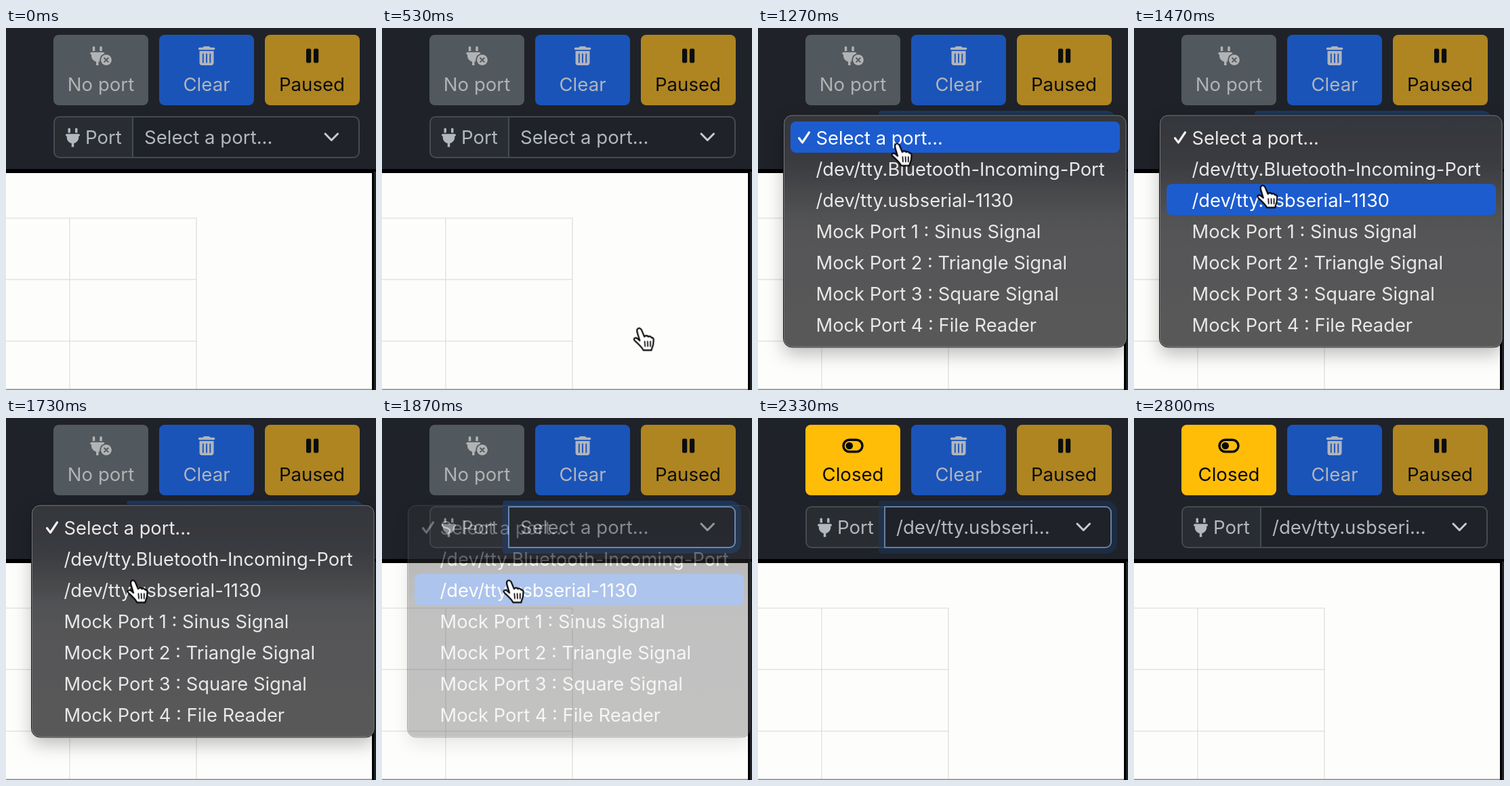
An HTML page for the animation above (2870 ms loop, 546 by 534 pixels).

```html
<!DOCTYPE html>
<html lang="en">
<head>
<meta charset="utf-8">
<title>Port selection</title>
<style>
  html, body { margin: 0; width: 100%; height: 100%; overflow: hidden; background: #1f2228; }
  svg { display: block; width: 100vw; height: 100vh; }
  text {
    font: 27.6px Inter, "Liberation Sans", sans-serif;
    font-optical-sizing: none;
    white-space: pre;
  }
  .mid { text-anchor: middle; }
  .menu text { font-size: 27.3px; fill: #e8e8e8; }

  .step { animation: 2870ms step-end infinite; }
  .before { animation-name: before; }
  .after { animation-name: after; }
  .button { animation-name: button; }
  .ink { animation-name: ink; }
  .focus { animation-name: focus; }
  .menu { animation-name: menu; }
  .bar { animation-name: bar; }
  .row0 { animation-name: row0; }
  .row1 { animation-name: row1; }
  .row2 { animation-name: row2; }
  .ring { animation-name: ring; }
  .cursor { animation: move 2870ms linear infinite; }

  @keyframes before { 0% { opacity: 1 } 71.95%, 100% { opacity: 0 } }
  @keyframes after { 0% { opacity: 0 } 71.95%, 100% { opacity: 1 } }
  @keyframes button {
    0% { fill: #51595e }
    71.95% { fill: #7b7a6c }
    74.04% { fill: #c0983a }
    76.5% { fill: #f3b412 }
    78.9%, 100% { fill: #ffbd08 }
  }
  @keyframes ink {
    0% { color: #dcdcd2 }
    74.04% { color: #696660 }
    76.5%, 100% { color: #080808 }
  }
  @keyframes focus {
    0% { opacity: 0 }
    34.5% { opacity: 1 }
    81% { opacity: .5 }
    83.5%, 100% { opacity: 0 }
  }
  @keyframes menu {
    0% { opacity: 0 }
    34.5% { opacity: 1 }
    64.98% { opacity: .36 }
    67.07% { opacity: .15 }
    69.5%, 100% { opacity: 0 }
  }
  @keyframes bar {
    0% { transform: none; opacity: 1 }
    48.6% { transform: translateY(46px); opacity: 1 }
    51.05% { transform: translateY(92px); opacity: 1 }
    60.1% { transform: translateY(92px); opacity: 0 }
    62.5%, 100% { transform: translateY(92px); opacity: 1 }
  }
  @keyframes row0 { 0% { fill: #fff } 48.6%, 100% { fill: #e8e8e8 } }
  @keyframes row1 { 0% { fill: #e8e8e8 } 48.6% { fill: #fff } 51.05%, 100% { fill: #e8e8e8 } }
  @keyframes row2 {
    0% { fill: #e8e8e8 }
    51.05% { fill: #fff }
    60.1% { fill: #e8e8e8 }
    62.5%, 100% { fill: #fff }
  }
  @keyframes ring {
    0% { opacity: 0; transform: translate(205px, 164px) }
    32.06% { opacity: 1; transform: translate(205px, 164px) }
    34.5% { opacity: 0; transform: translate(187px, 239px) }
    53.1% { opacity: 1; transform: translate(187px, 239px) }
    57.84%, 100% { opacity: 0; transform: translate(187px, 239px) }
  }
  @keyframes move {
    0%, 16.03% { transform: translate(430px, 560px) }
    20.9% { transform: translate(330px, 330px) }
    25.4% { transform: translate(240px, 205px) }
    30.3% { transform: translate(206px, 168px) }
    32.06%, 33.5% { transform: translate(205px, 166px) }
    34.8%, 46.2% { transform: translate(205px, 171px) }
    48.6% { transform: translate(199px, 200px) }
    51.05% { transform: translate(190px, 232px) }
    53.1%, 67.07% { transform: translate(187px, 240px) }
    71.8%, 100% { transform: translate(230px, 560px) }
  }
</style>
</head>
<body>
<svg viewBox="0 0 546 534">
  <defs>
    <path id="plug" d="M96 0C78 0 64 14 64 32v96h64V32C128 14 114 0 96 0zM288 0c-18 0-32 14-32 32v96h64V32C320 14 306 0 288 0zM32 160c-18 0-32 14-32 32s14 32 32 32v32c0 77 55 142 128 157v99h64v-99c73-15 128-80 128-157v-32c18 0 32-14 32-32s-14-32-32-32z"/>
    <linearGradient id="glass" x1="0" y1="0" x2="0" y2="1">
      <stop offset="0" stop-color="#34363b"/>
      <stop offset=".2" stop-color="#3a3b40"/>
      <stop offset=".3" stop-color="#444548"/>
      <stop offset=".42" stop-color="#505153"/>
      <stop offset=".58" stop-color="#565658"/>
      <stop offset="1" stop-color="#595959"/>
    </linearGradient>
    <filter id="shadow" x="-20%" y="-20%" width="140%" height="140%">
      <feDropShadow dx="0" dy="11" stdDeviation="13" flood-color="#000" flood-opacity=".25"/>
    </filter>
  </defs>

  <!-- page and chart -->
  <rect width="546" height="534" fill="#1f2228"/>
  <rect y="208" width="546" height="326" fill="#000"/>
  <rect x="543" y="212" width="3" height="322" fill="#1f2228"/>
  <rect y="214" width="540" height="320" fill="#fdfdfc"/>
  <g fill="none" stroke="#e3e3de" stroke-width="1.5">
    <path d="M0 280.5H281M0 371H281M0 462H281M94 280V534M281 280V534"/>
  </g>
  <rect y="532.5" width="540" height="1.5" fill="#8a8a8a"/>

  <!-- buttons -->
  <rect class="step button" x="70" y="10" width="140" height="104" rx="8" fill="#51595e"/>
  <rect x="226" y="10" width="140" height="104" rx="8" fill="#1a54b8"/>
  <rect x="382" y="10" width="140" height="104" rx="8" fill="#ae8520"/>

  <g class="step before" fill="#b1b3b4">
    <g transform="translate(124.3 27) scale(.0547)">
      <use href="#plug"/>
      <circle cx="432" cy="368" r="178" fill="#51595e"/>
      <circle cx="432" cy="368" r="144"/>
      <path d="M382 318l100 100M482 318l-100 100" stroke="#51595e" stroke-width="38" stroke-linecap="round"/>
    </g>
    <text class="mid" x="140" y="93">No port</text>
  </g>
  <g class="step after" opacity="0">
    <g class="step ink" fill="currentColor">
      <rect x="126" y="32.2" width="28" height="17.6" rx="8.8" fill="none" stroke="currentColor" stroke-width="3.5"/>
      <circle cx="134.8" cy="41" r="5.3"/>
      <text class="mid" x="140" y="93">Closed</text>
    </g>
  </g>

  <g fill="#b1b5bc">
    <g transform="translate(283.8 27) scale(.0547)">
      <path d="M135 18C141 7 152 0 164 0h120c12 0 23 7 29 18l7 14h96c18 0 32 14 32 32s-14 32-32 32H32C14 96 0 82 0 64s14-32 32-32h96zM32 128h384v320c0 35-29 64-64 64H96c-35 0-64-29-64-64z"/>
      <path d="M128 208v224M224 208v224M320 208v224" stroke="#1a54b8" stroke-width="34" stroke-linecap="round"/>
    </g>
    <text class="mid" x="296" y="93">Clear</text>
  </g>

  <g fill="#0c0d0e">
    <rect x="443" y="30.5" width="7.2" height="21" rx="2"/>
    <rect x="454" y="30.5" width="7.2" height="21" rx="2"/>
    <text class="mid" x="451.5" y="93">Paused</text>
  </g>

  <!-- port picker -->
  <rect x="71" y="131" width="450" height="60" rx="8" fill="#1f2228"/>
  <path d="M187 131H79a8 8 0 0 0-8 8v44a8 8 0 0 0 8 8h108z" fill="#292d32"/>
  <rect x="71" y="131" width="450" height="60" rx="8" fill="none" stroke="#454b51" stroke-width="2"/>
  <path d="M187 131v60" stroke="#454b51" stroke-width="2"/>
  <g class="step focus" fill="none" opacity="0">
    <path d="M182 126H514a12 12 0 0 1 12 12v46a12 12 0 0 1-12 12H182z" stroke="#1c375e" stroke-width="8" stroke-linejoin="round"/>
    <path d="M187 131H513a8 8 0 0 1 8 8v44a8 8 0 0 1-8 8H187z" stroke="#86b2f0" stroke-width="2"/>
  </g>
  <g fill="#b3b8be">
    <use href="#plug" transform="translate(88 147.5) scale(.0547)"/>
    <text x="117" y="171">Port</text>
    <text class="step before" x="204" y="171">Select a port...</text>
    <text class="step after" x="204" y="171" opacity="0">/dev/tty.usbseri...</text>
  </g>
  <path d="M471 156l9.3 9.5 9.3-9.5" fill="none" stroke="#c8ccd0" stroke-width="3" stroke-linecap="round" stroke-linejoin="round"/>

  <!-- dropdown -->
  <g class="step menu" opacity="0">
    <rect x="38" y="128.5" width="505.5" height="342" rx="12" fill="url(#glass)" filter="url(#shadow)"/>
    <rect x="37.5" y="128" width="506.5" height="343" rx="12.5" fill="none" stroke="#17181b"/>
    <rect x="38.5" y="129" width="504.5" height="341" rx="11.5" fill="none" stroke="#77787a"/>
    <rect class="step bar" x="48" y="138" width="486" height="46" rx="8" fill="#1d5ccf"/>
    <path d="M60.5 162.5l5 6.5 10-15" fill="none" stroke="#f2f2f2" stroke-width="3.2" stroke-linecap="round" stroke-linejoin="round"/>
    <text class="step row0" x="85.5" y="172">Select a port...</text>
    <text class="step row1" x="85.5" y="218">/dev/tty.Bluetooth-Incoming-Port</text>
    <text class="step row2" x="85.5" y="264">/dev/tty.usbserial-1130</text>
    <text x="85.5" y="310">Mock Port 1 : Sinus Signal</text>
    <text x="85.5" y="356">Mock Port 2 : Triangle Signal</text>
    <text x="85.5" y="402">Mock Port 3 : Square Signal</text>
    <text x="85.5" y="448">Mock Port 4 : File Reader</text>
  </g>

  <!-- pointer -->
  <g class="step ring" fill="none" opacity="0">
    <circle r="60" stroke="#fff" stroke-width="5.4"/>
    <circle r="60" stroke="#000" stroke-width="3"/>
  </g>
  <g class="cursor" stroke="#000" stroke-linejoin="round" stroke-linecap="round">
    <g transform="translate(-.5 -.5) scale(1.05)">
      <path d="M-1.5 1C0-1 3 0 4 2.5L8 12C9 10 12.5 10 13.5 12 15 11 17.5 11.5 18 13.5 20 13 21 14.5 21 16.5L20.5 22C20.5 25 18.5 27 18 31H6.5C5 27 0 23-6 17-8 14.5-4.5 12.5-2 14.5L1.5 17.5-2 6C-2.5 4-2.5 2-1.5 1z" fill="#fff" stroke-width="2"/>
      <path d="M8.5 18.5l.5 7M12.5 18.5l.3 7M16.5 18.5v7" fill="none" stroke-width="1.6"/>
    </g>
  </g>
</svg>
</body>
</html>
```
